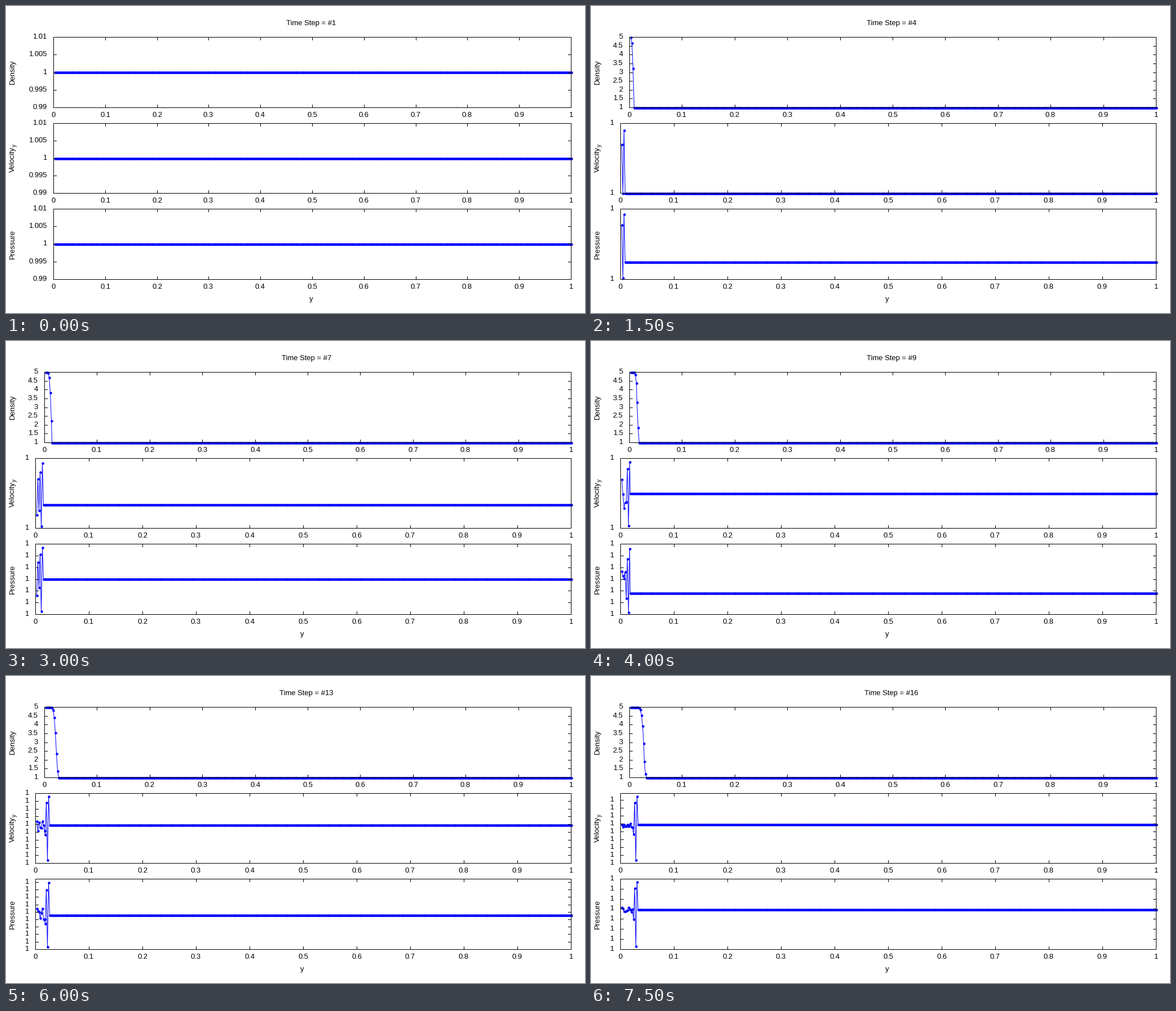
Animation, 1027 px wide and 545 px high, one loop 8 s. Source, as a matplotlib script:

```python
import numpy as np
import matplotlib.pyplot as plt
from matplotlib.animation import FuncAnimation
from matplotlib.collections import LineCollection

W, H, DPI = 1027, 545, 64
PX = 72 / DPI  # points per pixel
STEPS, CELLS, CFL = 16, 500, 0.822
RIGHT, TICK = 1002, 5
TOPS, BOTTOMS = (55, 208, 360), (180, 332, 485)
X = np.linspace(0.0029, 1, CELLS)
BLUE = "#0000ff"

# Autoscaled axes: (from step, rest level, tick pitch) in pixels
VELOCITY = [(3, 332, 124), (4, 290, 124), (7, 270, 124),
            (9, 279, 17.7), (11, 264, 13.77), (14, 263, 14)]
PRESSURE = [(2, 360, 125), (3, 454, 125), (4, 422, 20.83), (7, 447, 20.83),
            (9, 433, 13.2), (11, 424, 13.25), (14, 414, 17.9)]
# Overshoot at the front, leading cell first, as shares of the free height
FRONT = np.array([0.9, -0.92, 0.7, -0.25])

plt.rcParams["font.family"] = "Liberation Sans"
fig = plt.figure(figsize=(W / DPI, H / DPI), dpi=DPI, facecolor="white")
ax = fig.add_axes([0, 0, 1, 1])


def text(x, y, s, ha="center", size=13, rot=0):
    ax.text(x, y, s, ha=ha, va="baseline", fontsize=size * PX, rotation=rot,
            rotation_mode="anchor", color="black", zorder=5)


def density(n):
    """First-order upwind advection of a step entering from the left."""
    rho = np.ones(CELLS)
    for _ in range(n):
        rho += CFL * (np.concatenate(([5.0], rho[:-1])) - rho)
    return rho


def ripple(i, keys, n):
    """Round-off noise: an overshooting front with a fading random wake."""
    top, bottom = TOPS[i], BOTTOMS[i]
    _, rest, pitch = [k for k in keys if k[0] <= n][-1]
    wake = min(0.6, 0.5 * 0.77 ** (n - 8))
    share = np.random.default_rng(100 * i + n).uniform(-wake, wake, n)
    m = min(n, len(FRONT))
    share[:m] = FRONT[:m]

    y = np.full(CELLS, float(rest))
    y[:n] -= share[::-1] * np.where(share[::-1] > 0, rest - top, bottom - rest)
    return y, [(t, "1") for t in np.arange(bottom, top - 0.5, -pitch)]


def flat(i):
    labels = ("1.01", "1.005", "1", "0.995", "0.99")
    levels = np.linspace(TOPS[i], BOTTOMS[i], 5)
    return np.full(CELLS, levels[2]), list(zip(levels, labels))


def panel(i, left, y, ticks):
    top, bottom = TOPS[i], BOTTOMS[i]
    # data sit on pixel centres
    px = np.floor(left + X * (RIGHT - left)) + 0.5
    py = np.floor(y) + 0.5
    ax.plot(px, py, color=BLUE, lw=PX, snap=False, zorder=2)
    ax.plot(px, py, "o", color=BLUE, ms=4.5 * PX, mew=0, zorder=3)

    segs = [[(left, top), (RIGHT, top)], [(left, bottom), (RIGHT, bottom)],
            [(left, top), (left, bottom)], [(RIGHT, top), (RIGHT, bottom)]]
    for k in range(11):
        x = round(left + (RIGHT - left) * k / 10)
        segs += [[(x, top), (x, top + TICK)],
                 [(x, bottom), (x, bottom - TICK)]]
        text(x, bottom + 17, f"{k / 10:g}")
    for t, label in ticks:
        t = round(t)
        segs += [[(left, t), (left + TICK, t)], [(RIGHT, t), (RIGHT - TICK, t)]]
        text(left - 11.5, t + 3, label, ha="right")
    ax.add_collection(LineCollection(segs, colors="black", linewidths=PX,
                                     antialiaseds=False, zorder=4))


def draw(n):
    ax.clear()
    ax.set(xlim=(0, W), ylim=(H, 0))
    ax.axis("off")

    if n == 0:
        left = 84
        panel(0, left, *flat(0))
    else:
        left = 68
        unit = (BOTTOMS[0] - TOPS[0]) / 4
        ticks = [(BOTTOMS[0] - unit * (v - 1), f"{v:g}")
                 for v in np.arange(1, 5.5, 0.5)]
        panel(0, left, BOTTOMS[0] - unit * (density(n) - 1), ticks)
    text((left + RIGHT) / 2 - 2, 34, f"Time Step = #{n + 1}")

    for i, keys in ((1, VELOCITY), (2, PRESSURE)):
        started = n >= keys[0][0]
        left = 52 if started else 84
        panel(i, left, *(ripple(i, keys, n) if started else flat(i)))
    text((left + RIGHT) / 2 - 2, 524, "y")

    text(14.5, 117.5, "Density", rot=90)
    text(14.5, 273, "Velocity", rot=90)
    text(17.5, 247.5, "y", size=10, rot=90)
    text(14.5, 422.5, "Pressure", rot=90)
    return []


anim = FuncAnimation(fig, draw, frames=STEPS, init_func=lambda: [],
                     interval=500, repeat=True, repeat_delay=0)
plt.show()
```
